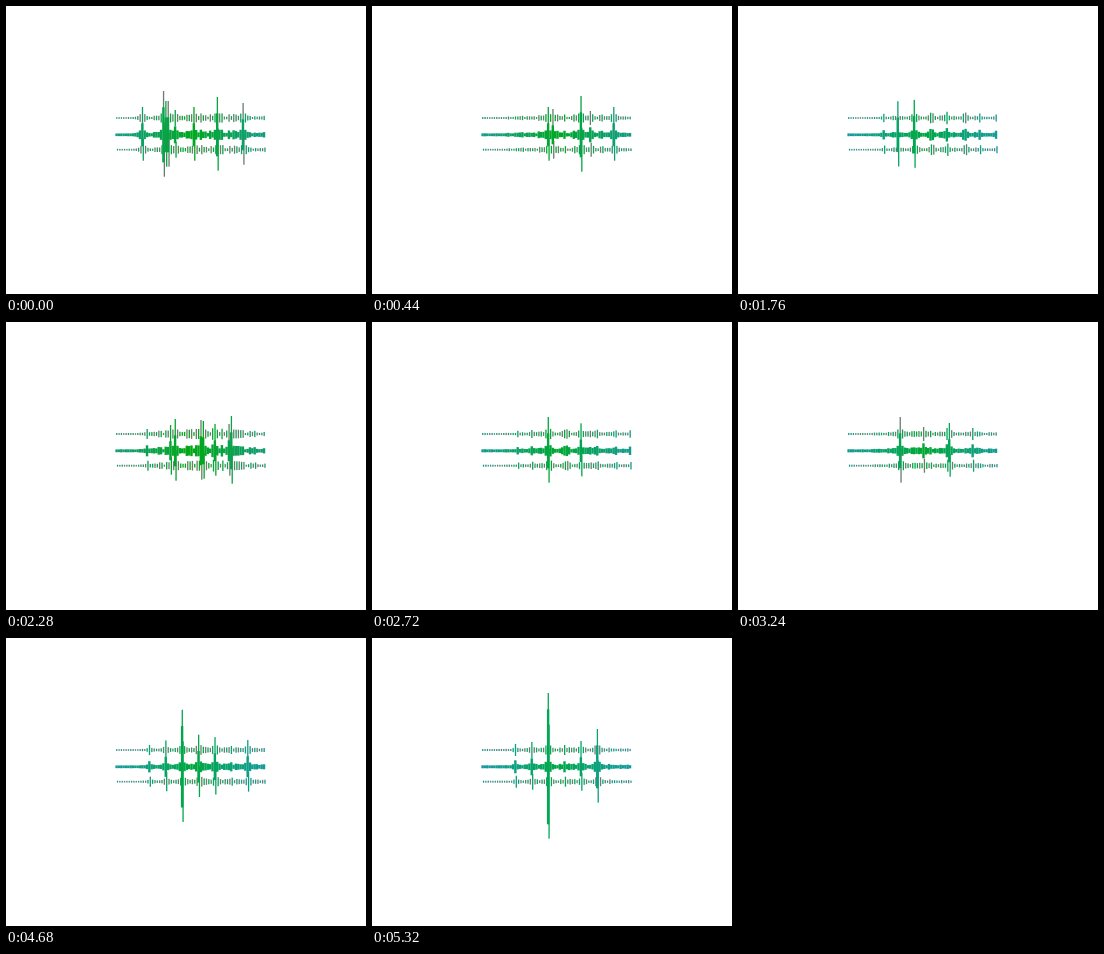
An HTML page with a canvas for the animation above (5360 ms loop, 360 by 288 pixels).

```html
<!DOCTYPE html>
<html lang="en">
<head>
<meta charset="utf-8">
<title>Audio spectrum</title>
<style>
html, body { margin: 0; width: 100%; height: 100%; overflow: hidden; background: #fff; }
canvas { display: block; }
</style>
</head>
<body>
<canvas id="stage" width="360" height="288"></canvas>
<script>
const ctx = document.getElementById('stage').getContext('2d');
const BARS = 64, PITCH = 2.34, STEP = 40, STEPS = 134;
const OVERTONE = 7; // bars between the partials of a tone

const mix = (a, b, u) => a + (b - a) * u;

function random(seed) {
  let s = seed * 7919 + 17;
  return () => {
    s = (s + 0x6D2B79F5) | 0;
    let v = Math.imul(s ^ (s >>> 15), 1 | s);
    v ^= v + Math.imul(v ^ (v >>> 7), 61 | v);
    return ((v ^ (v >>> 14)) >>> 0) / 4294967296;
  };
}

// Loudness across the spectrum: silent bass, strong middle, soft treble.
const envelope = i => i < 10 ? 0 : Math.sin(Math.PI * (i - 8) / 62);

// Noise floor plus peaks [bar, half height] that fade into their neighbours.
function makePose(step, noise, hue, peaks) {
  const rnd = random(step + 1);
  const h = Array.from({ length: BARS }, (_, i) =>
    0.8 + 0.3 * rnd() + noise * envelope(i) * rnd());
  for (const [bar, size] of peaks) {
    for (let i = Math.max(0, bar - 3); i <= Math.min(BARS - 1, bar + 3); i++) {
      const d = Math.abs(i - bar);
      h[i] = Math.max(h[i], d ? Math.min(size * 0.35, 4.5) / d : size);
    }
  }
  return { step, h, hue };
}

// A tone: partials at equal distances, one of them loud.
function makeTone(step, loud) {
  const rnd = random(step + 500);
  const peaks = [];
  for (let bar = 2 * OVERTONE; bar < BARS; bar += OVERTONE) {
    peaks.push([bar + Math.floor(rnd() * 1.4), 3 + rnd() * envelope(bar) * Math.min(17, loud * 0.45)]);
  }
  peaks.push([OVERTONE * (3 + Math.floor(rnd() * 2)), loud]);
  return makePose(step, 3, 134 + rnd() * 12, peaks);
}

const poses = [
  makePose(0, 4, 131, [[11, 11], [20, 27], [21, 17], [22, 17], [25, 8], [33, 11], [43, 21], [54, 15]]),
  makePose(11, 3, 133, [[28, 11], [30, 9], [42, 22], [46, 7], [56, 11]]),
  makePose(30, 2.5, 142, [[14, 8], [25, 7], [29, 33], [42, 26], [43, 23], [58, 7]]),
  makePose(57, 5, 126, [[13, 5], [23, 9], [25, 15], [36, 14], [37, 13], [42, 10], [48, 10], [49, 18]]),
  makePose(81, 2.5, 138, [[22, 17], [32, 7], [42, 6], [43, 11], [53, 6]]),
  makePose(102, 5, 143, [[21, 22], [28, 25], [35, 7], [42, 18], [45, 12], [49, 11]]),
  makePose(133, 2, 145, [[14, 6], [21, 8], [28, 57], [35, 5], [42, 9], [49, 21]])
];

// A strong beat every 14 steps, swelling once per loop, with a weak one after it.
for (let k = 0; k < 10; k++) {
  const swell = 49 + 18 * Math.cos((k - 0.5) * Math.PI / 5);
  poses.push(makeTone(6 + 14 * k, swell));
  if (k < 9) poses.push(makeTone(13 + 14 * k, swell * 0.4));
}
poses.sort((a, b) => a.step - b.step);

function poseAt(step) {
  const next = poses.findIndex(p => p.step >= step);
  const b = poses[next], a = poses[Math.max(0, next - 1)];
  const u = b.step === step ? 1 : (step - a.step) / (b.step - a.step);
  const rnd = random(step + 2000);
  const flicker = 0.35 * Math.sin(Math.PI * u);
  return {
    h: b.h.map((v, i) => Math.max(0.8, mix(a.h[i], v, u) * (1 - flicker * rnd()))),
    hue: mix(a.hue, b.hue, u)
  };
}

// Green in the middle, teal towards both ends.
function barColor(hue, i, grey) {
  const d = Math.min(1, Math.abs(i - 32) / 32);
  if (grey) return `hsl(${hue}, 9%, 45%)`;
  return `hsl(${hue + 38 * d}, ${mix(100, 78, d)}%, ${mix(33, 34, d)}%)`;
}

function drawRow(pose, x, y, width, extra, tinted) {
  for (let i = 0; i < BARS; i++) {
    const half = pose.h[i] + extra;
    const grey = tinted && i % 2 === 0 && i % (2 * OVERTONE) !== 0;
    ctx.fillStyle = barColor(pose.hue, i, grey);
    ctx.fillRect(x + i * PITCH, y - half, width, half * 2);
  }
}

function draw(step) {
  const pose = poseAt(step);
  ctx.fillStyle = '#fff';
  ctx.fillRect(0, 0, 360, 288);
  drawRow(pose, 110.1, 112, 1.3, 0, true);
  drawRow(pose, 110.9, 143.7, 1.3, 0, true);
  drawRow(pose, 109.4, 128.8, 2.4, 0.5, false);
}

const start = performance.now();
function tick() {
  draw(Math.floor((performance.now() - start) / STEP) % STEPS);
  requestAnimationFrame(tick);
}
tick();
</script>
</body>
</html>
```
